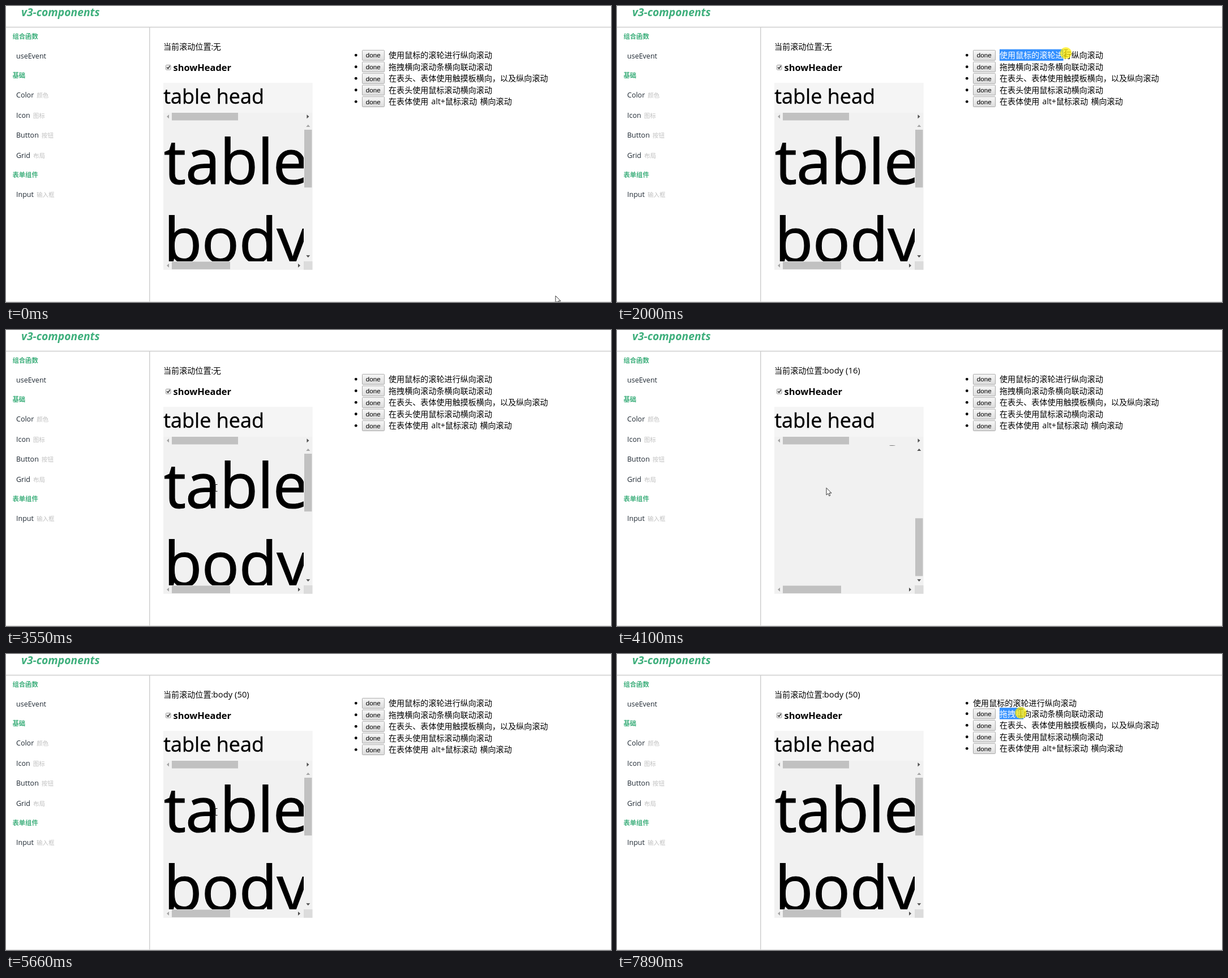
An HTML page for the animation above (7990 ms loop, 1069x524 px).

```html
<!DOCTYPE html>
<html lang="zh-CN">
<head>
<meta charset="utf-8">
<title>v3-components</title>
<style>
  html, body { margin: 0; width: 100%; height: 100%; overflow: hidden; background: #fff; }
  svg { display: block; width: 1069px; height: 524px; font-family: "Open Sans", "Noto Sans CJK SC", "Noto Sans CJK", sans-serif; }
  text { white-space: pre; }
  .logo { font: italic bold 19.3px "Open Sans", sans-serif; fill: #3eaf7c; }
  .group { font-size: 11.3px; font-weight: bold; fill: #3eaf7c; }
  .item { font-size: 12.5px; fill: #1f2933; }
  .note { font-size: 10.6px; fill: #c0c0c0; }
  .copy { font-size: 14.08px; word-spacing: 1.5px; }
  .latin { font-size: 14.8px; }
  .title { font-size: 16.4px; font-weight: bold; }
  .head { font-size: 36px; stroke: #000; stroke-width: .4px; }
  .big { font-size: 110px; letter-spacing: -.6px; stroke: #000; stroke-width: 1.2px; }
  .btn { font: 11.7px "Liberation Sans", Arial, sans-serif; }
</style>
</head>
<body>
<svg id="stage" viewBox="0 0 1069 524">
  <defs>
    <linearGradient id="face" x2="0" y2="1"><stop stop-color="#f7f7f7"/><stop offset="1" stop-color="#dcdcdc"/></linearGradient>
    <clipPath id="view"><rect x="278" y="204" width="248" height="248"/></clipPath>
  </defs>
</svg>
<script>
const LOOP = 7990, STEP = 77, EM = 14.08, BOTTOM = 278;
const LIGHT = '#a3a3a3', DARK = '#505050', THUMB = '#c1c1c1';
const stage = document.getElementById('stage');

function add(tag, attrs, parent = stage, content = '') {
  const el = document.createElementNS('http://www.w3.org/2000/svg', tag);
  set(el, attrs);
  el.textContent = content;
  return parent.appendChild(el);
}
function set(el, attrs) { for (const key in attrs) el.setAttribute(key, attrs[key]); }
const show = (el, on) => set(el, { visibility: on ? 'inherit' : 'hidden' });
const move = (el, x, y) => set(el, { transform: `translate(${x} ${y})` });
const rect = (x, y, width, height, fill, parent) => add('rect', { x, y, width, height, fill }, parent);
const label = (x, y, content, cls, parent) => add('text', { x, y, class: cls }, parent, content);
const arrow = (x, y, turn, fill) =>
  add('path', { d: 'M-3.5 2L0-2L3.5 2Z', fill, transform: `translate(${x} ${y}) rotate(${turn})` });

// Page frame and sidebar
rect(0, 36.7, 1069, 1.6, '#cfcfcf');
rect(253, 38, 1.5, 486, '#cfcfcf');
rect(0, 523, 1069, 1, '#dcdcdc');
label(27, 18, 'v3-components', 'logo');

const menu = {
  '组合函数': ['useEvent'],
  '基础': ['Color 颜色', 'Icon 图标', 'Button 按钮', 'Grid 布局'],
  '表单组件': ['Input 输入框']
};
let menuY = 58.4;
for (const group in menu) {
  label(11.5, menuY, group, 'group');
  menu[group].forEach((entry, i) => {
    menuY += i ? 35.6 : 34.5;
    const [name, note] = entry.split(' ');
    const item = label(18, menuY, name, 'item');
    if (note) add('tspan', { dx: 5, class: 'note' }, item, note);
  });
  menuY += 34.5;
}

// Status line and checkbox
label(278, 77, '当前滚动位置:', 'copy');
const status = label(365.7, 77, '无', 'copy');
add('rect', { x: 282.5, y: 104.5, width: 8.5, height: 8.5, rx: 1, fill: '#f2f2f2', stroke: '#999' });
add('path', { d: 'M284.3 108.6l2 2.2l3.4-4.9', fill: 'none', stroke: '#333', 'stroke-width': 1.6 });
label(295.5, 114.6, 'showHeader', 'title');

// Table with its scrollbars
rect(278, 136, 263.5, 331, '#f1f1f1');
rect(278, 136, 263.5, 53, '#f5f5f5');
label(278.3, 173, 'table head', 'head');
const content = add('g', {}, add('g', { 'clip-path': 'url(#view)' }));
label(279, 315, 'table', 'big', content);
label(279, 454.3, 'body', 'big', content);
rect(526, 452, 15.5, 15, '#dcdcdc');
function scrollbar(y, width, end) {
  rect(293, y - 6.8, width, 13.5, THUMB);
  arrow(286, y, -90, LIGHT);
  arrow(end, y, 90, DARK);
}
scrollbar(195.8, 117, 533.5);
scrollbar(459.4, 103, 518);
const thumb = rect(527, 219, 13.5, 102.3, THUMB);
const up = arrow(533.8, 212, 0), down = arrow(533.8, 443.3, 180);

// Task list
const rows = ['使用鼠标的滚轮进行纵向滚动', '拖拽横向滚动条横向联动滚动',
  '在表头、表体使用触摸板横向，以及纵向滚动', '在表头使用鼠标滚动横向滚动',
  '在表体使用 alt+鼠标滚动 横向滚动'].map(copy => {
  const g = add('g', {});
  add('circle', { cx: 618.3, cy: .3, r: 2.4 }, g);
  const button = add('g', {}, g);
  const face = add('rect', { x: 629.5, y: -8.5, width: 39, height: 18, rx: 1 }, button);
  set(face, { fill: 'url(#face)', stroke: '#a9a9a9' });
  label(635.8, 4.6, 'done', 'btn', button);
  const words = add('g', {}, g);
  label(676, 5.2, copy, 'copy', words);
  const mark = rect(676, -10.2, 0, 20.3, '#3390ff', words);
  const picked = label(676, 5.2, '', 'copy', words);
  set(picked, { fill: '#fff' });
  return { g, button, face, words, mark, picked, copy };
});

// Pointer
const pointer = add('g', {});
const hand = add('path', { d: 'M0 0V12.6L2.9 9.9L4.9 14.3L6.8 13.5L4.9 9.2H9Z', fill: '#fff', stroke: '#222', 'stroke-width': .9 }, pointer);
const beam = add('path', { d: 'M-3.5-6H3.5M0-6V6M-3.5 6H3.5', fill: 'none', stroke: '#111' }, pointer);
const halo = add('circle', { r: 10.3, fill: '#ffeb00', opacity: .72 }, pointer);

// Each entry: start, end, then the values reached
const path = [
  [70, 130, 918, 443],
  [360, 440, 886, 439],
  [590, 1450, 683, 82],
  [1600, 2290, 853, 84],
  [2690, 2927, 950, 53],
  [3006, 3550, 370, 279.5],
  [5990, 6740, 645, 87],
  [7280, 7740, 684, 103],
  [7890, 7890, 713.5, 104]
];
const wheel = [
  [3870, 4100, BOTTOM - 2, 16],
  [4410, 4500, BOTTOM, 19],
  [4640, 4810, 0, 30],
  [5100, 5280, BOTTOM, 40],
  [5570, 5660, 0, 50]
];
const SELECT = 1600, RELEASE = 2480, CLEAR = 2927, PRESS = 6890, DONE = 7050, SELECT_NEXT = 7890;
const presses = [[SELECT, RELEASE], [CLEAR, CLEAR + STEP], [PRESS, DONE], [SELECT_NEXT, LOOP]];

function sample(track, initial, t) {
  let now = initial;
  for (const [from, to, ...goal] of track) {
    if (t < from) break;
    const gaps = Math.round((to - from) / STEP);
    const step = t >= to ? gaps : Math.floor((t - from) / (to - from) * gaps);
    const p = (step + 1) / (gaps + 1), ease = p * p * (3 - 2 * p);
    now = now.map((v, i) => v + (goal[i] - v) * ease);
  }
  return now;
}

function overText(x, y, scroll, done) {
  const inside = (l, t, r, b) => x >= l && x <= r && y >= t && y <= b;
  return inside(279, 205, 526, Math.min(452, 484 - scroll)) || inside(279, 138, 455, 186) ||
    inside(676, 77, 859, 178) || (done && inside(629, 77, 811, 96));
}

function draw(t) {
  const [x, y] = sample(path, [971, 513], t);
  const [scroll, count] = sample(wheel, [0, 0], t);
  const done = t >= DONE, pressed = presses.some(([a, b]) => t >= a && t < b);

  move(content, 0, -scroll);
  set(thumb, { y: 219 + scroll * .414 });
  set(up, { fill: scroll ? DARK : LIGHT });
  set(down, { fill: scroll < BOTTOM ? DARK : LIGHT });
  status.textContent = count ? `body (${Math.round(count)})` : '无';
  set(status, { class: count ? 'latin' : 'copy' });

  const selected = t >= SELECT && t < CLEAR ? 0 : t >= SELECT_NEXT ? 1 : -1;
  rows.forEach((row, i) => {
    const gone = done && i === 0;
    move(row.g, 0, 86.8 + i * 20.55 - (done && i ? 2 : 0));
    move(row.words, gone ? -47 : 0, 0);
    show(row.button, !gone);
    const n = i === selected ? Math.max(0, Math.round((x - 676) / EM)) : 0;
    set(row.mark, { width: n * EM });
    row.picked.textContent = row.copy.slice(0, n);
  });
  const hover = x > 629 && x < 669 && y > 78 && y < 97;
  set(rows[0].face, { stroke: hover ? '#858585' : '#a9a9a9', fill: hover && pressed ? '#dcdcdc' : 'url(#face)' });

  const typing = overText(x, y, scroll, done);
  move(pointer, x, y);
  show(halo, pressed);
  show(beam, typing);
  show(hand, !typing);
}

const start = performance.now();
function tick() {
  draw((performance.now() - start) % LOOP);
  requestAnimationFrame(tick);
}
tick();
</script>
</body>
</html>
```
